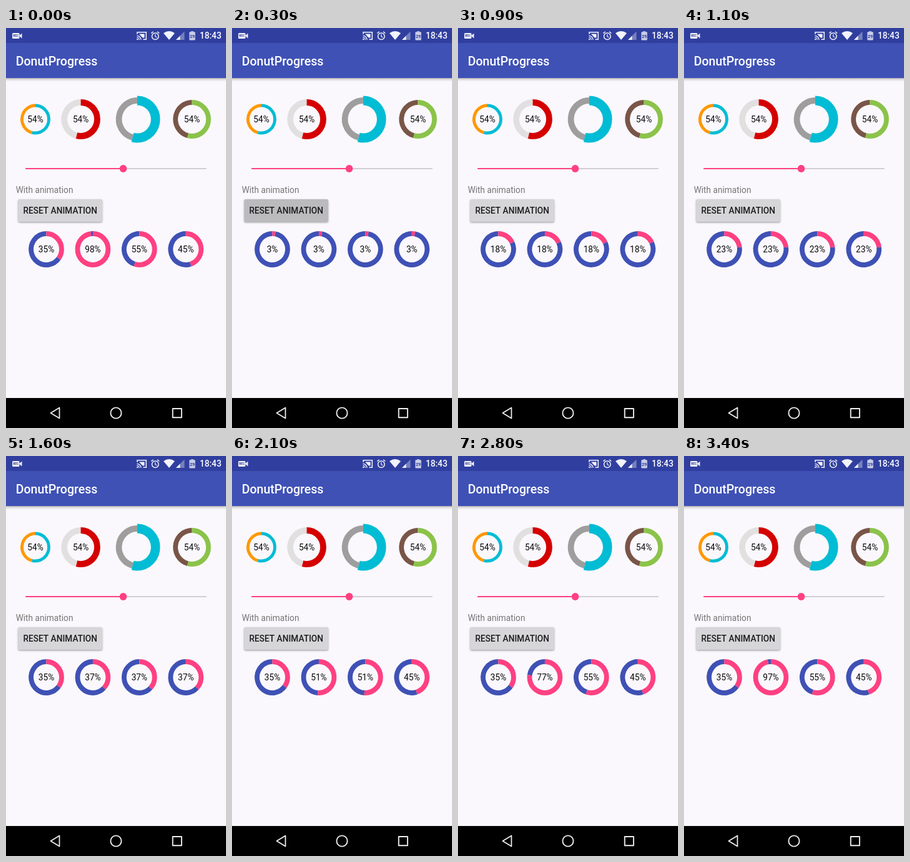
These frames come from a looping animation (352x640 px, 3500 ms). An HTML page with a canvas:

```html
<!DOCTYPE html>
<html lang="en">
<head>
<meta charset="utf-8">
<title>DonutProgress</title>
<style>
html, body { margin: 0; width: 100%; height: 100%; overflow: hidden; background: #faf8fc; }
canvas { display: block; width: 352px; height: 640px; }
</style>
</head>
<body>
<canvas id="stage"></canvas>
<script>
const W = 352, H = 640, LOOP = 3500, STEP = 100;
const DP = W / 360; // the 360dp wide layout is squeezed horizontally
const BG = '#faf8fc', INDIGO = '#3f51b5', PINK = '#ff4081', CYAN = '#00bcd4';
const canvas = document.getElementById('stage');
const ctx = canvas.getContext('2d');
const dpr = window.devicePixelRatio || 1;
canvas.width = W * dpr;
canvas.height = H * dpr;

function units(sx) { ctx.setTransform(dpr * sx, 0, 0, dpr, 0, 0); }

function rect(x, y, w, h, color) {
  ctx.fillStyle = color;
  ctx.fillRect(x, y, w, h);
}

function text(s, x, y, size, color, weight = 400, align = 'left') {
  ctx.font = `${weight} ${size}px Roboto, sans-serif`;
  ctx.textAlign = align;
  ctx.fillStyle = color;
  ctx.fillText(s, x, y);
}

function poly(points, color, width) {
  ctx.beginPath();
  points.forEach(([x, y]) => ctx.lineTo(x, y));
  if (width) {
    ctx.closePath();
    ctx.lineWidth = width;
    ctx.strokeStyle = color;
    ctx.stroke();
  } else {
    ctx.fillStyle = color;
    ctx.fill();
  }
}

function arc(x, y, r, from, to, color, width) {
  ctx.beginPath();
  ctx.arc(x, y, r, from, to);
  ctx.lineWidth = width;
  ctx.strokeStyle = color;
  ctx.stroke();
}

function line(x1, y1, x2, y2, color, width) {
  ctx.beginPath();
  ctx.moveTo(x1, y1);
  ctx.lineTo(x2, y2);
  ctx.lineWidth = width;
  ctx.strokeStyle = color;
  ctx.stroke();
}

function disc(x, y, r, color) {
  ctx.beginPath();
  ctx.arc(x, y, r, 0, Math.PI * 2);
  ctx.fillStyle = color;
  ctx.fill();
}

function roundBox(x, y, w, h, r, color) {
  ctx.beginPath();
  ctx.roundRect(x, y, w, h, r);
  ctx.fillStyle = color;
  ctx.fill();
}

// r is the middle radius shared by both strokes
function donut(x, y, r, percent, done, rest, doneWidth, restWidth = doneWidth, label = true) {
  const top = -Math.PI / 2, end = top + Math.PI * 2 * percent / 100;
  arc(x, y, r, end, top + Math.PI * 2, rest, restWidth);
  arc(x, y, r, top, end, done, doneWidth);
  if (label) text(percent + '%', x, y + 5, 14, '#0a0a0a', 400, 'center');
}

function track(keys, t) {
  for (let i = 1; i < keys.length; i++) {
    const [t0, a] = keys[i - 1], [t1, b] = keys[i];
    if (t <= t1) return a + (b - a) * (t - t0) / (t1 - t0);
  }
  return keys[keys.length - 1][1];
}

const PROGRESS = [[200, 0], [600, 10], [1100, 23], [1600, 37], [2100, 51], [2800, 77], [3400, 97]];
const RIPPLE = [[0, 0], [200, .13], [400, .12], [600, .045], [800, 0]];
const TARGETS = [35, 98, 55, 45];

function statusIcons() {
  const w = '#f2f3fb', bar = '#303f9f';
  // recorder
  roundBox(10, 8, 11.5, 9, 1.5, w);
  poly([[21, 12.5], [25.5, 8.5], [25.5, 16.5]], w);
  text('REC', 15.7, 14.4, 4.8, bar, 700, 'center');
  // cast
  ctx.lineJoin = 'miter';
  ctx.beginPath();
  ctx.moveTo(210, 10);
  ctx.lineTo(210, 6.8);
  ctx.lineTo(224.3, 6.8);
  ctx.lineTo(224.3, 18.2);
  ctx.lineTo(219.5, 18.2);
  ctx.lineWidth = 1.5;
  ctx.strokeStyle = w;
  ctx.stroke();
  poly([[213, 9.5], [221.5, 9.5], [221.5, 15.5], [218.5, 15.5]], w);
  for (const r of [3.8, 6.6]) arc(209.4, 19, r, -Math.PI / 2, 0, w, 1.3);
  disc(210.2, 18.1, 1.2, w);
  // alarm
  arc(238.8, 13.2, 5.3, 0, Math.PI * 2, w, 1.5);
  line(238.8, 10, 238.8, 13.7, w, 1.2);
  line(238.8, 13.5, 241.3, 15, w, 1.2);
  line(232.3, 8.5, 235.6, 5.8, w, 1.5);
  line(242, 5.8, 245.3, 8.5, w, 1.5);
  // wifi
  ctx.beginPath();
  ctx.moveTo(261, 19);
  ctx.lineTo(252, 8.2);
  ctx.quadraticCurveTo(261, 2, 270, 8.2);
  ctx.closePath();
  ctx.fillStyle = w;
  ctx.fill();
  // signal
  poly([[272, 19], [285.5, 5.5], [285.5, 19]], '#7580bd');
  poly([[272, 19], [278.5, 12.5], [278.5, 19]], w);
  // battery
  rect(296, 5, 4, 2, '#aab1d8');
  roundBox(293.3, 6.3, 9.4, 13.2, 1, '#c9cee8');
  text('29', 298, 15.8, 7.2, bar, 700, 'center');
}

function navIcons() {
  const w = '#eeeeee';
  ctx.lineJoin = 'round';
  poly([[71.5, 616], [85.5, 607.5], [85.5, 624.5]], w, 1.8);
  arc(176, 616, 8.6, 0, Math.PI * 2, w, 1.9);
  ctx.strokeStyle = w;
  ctx.lineWidth = 1.9;
  ctx.strokeRect(266.7, 609, 14.2, 14.2);
}

function button(alpha) {
  ctx.save();
  ctx.shadowColor = 'rgba(0,0,0,.38)';
  ctx.shadowBlur = 3 * dpr;
  ctx.shadowOffsetY = 1.2 * dpr;
  roundBox(20, 274, 137.3, 36, 2, '#d6d6d9');
  ctx.restore();
  if (alpha > 0) roundBox(20, 274, 137.3, 36, 2, `rgba(0,0,0,${alpha})`);
  text('RESET ANIMATION', 88.7, 297.2, 14, '#1c1c1e', 500, 'center');
}

function draw(t) {
  units(DP);
  rect(0, 0, 361, H, BG);

  const shade = ctx.createLinearGradient(0, 80, 0, 86);
  shade.addColorStop(0, 'rgba(0,0,0,.3)');
  shade.addColorStop(.4, 'rgba(0,0,0,.1)');
  shade.addColorStop(1, 'rgba(0,0,0,0)');
  rect(0, 80, 361, 6, shade);
  rect(0, 24, 361, 56, INDIGO);
  rect(0, 0, 361, 24, '#303f9f');
  rect(0, 592, 361, 48, '#000');
  text('DonutProgress', 16, 59.5, 20, '#fff', 500);
  text('18:43', 352.5, 17.3, 14, '#fff', 500, 'right');

  donut(48.1, 146, 22, 54, CYAN, '#ff9800', 5);
  donut(122.3, 146, 27, 54, '#d50000', '#e0e0e0', 10);
  donut(214.7, 146, 30, 54, CYAN, '#9e9e9e', 15, 10, false);
  donut(304.3, 146, 27, 54, '#8bc34a', '#795548', 8);

  rect(32, 224, 296, 2, '#d1cfd4');
  rect(32, 224, 159.8, 2, PINK);
  disc(191.8, 225, 6, PINK);

  text('With animation', 16, 264, 14, '#757575');
  button(track(RIPPLE, t));

  const value = Math.round(track(PROGRESS, t));
  TARGETS.forEach((target, i) => {
    const p = t < 200 ? target : Math.min(value, target);
    donut(66 + 76.1 * i, 354, 25, p, PINK, INDIGO, 8);
  });

  units(1);
  statusIcons();
  navIcons();
}

function tick() {
  const t = performance.now() % LOOP;
  draw(Math.floor(t / STEP) * STEP);
  requestAnimationFrame(tick);
}
tick();
</script>
</body>
</html>
```
